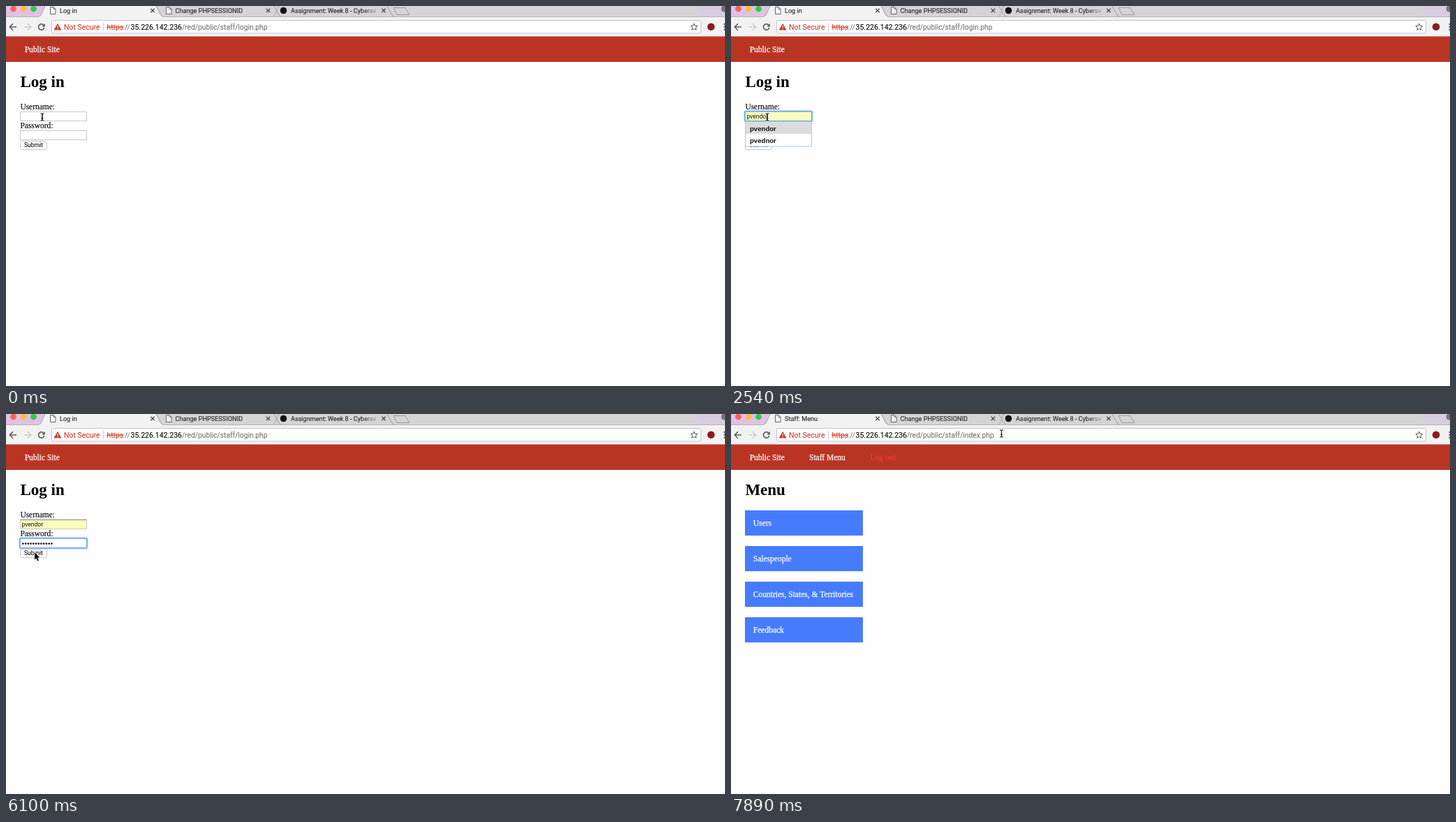
These frames come from a looping animation (1030x544 px, 8 s). An HTML page with a canvas:

```html
<!DOCTYPE html>
<html lang="en">
<head>
<meta charset="utf-8">
<title>Log in</title>
<style>
  html, body { margin: 0; width: 100%; height: 100%; overflow: hidden; background: #fefefe; }
  canvas { display: block; width: 1030px; height: 544px; }
</style>
</head>
<body>
<canvas id="stage"></canvas>
<script>
const W = 1030, H = 544, LOOP = 8000;
const canvas = document.getElementById('stage');
const ctx = canvas.getContext('2d');
const ratio = window.devicePixelRatio || 1;
canvas.width = W * ratio;
canvas.height = H * ratio;

const UI = 'Roboto, sans-serif';
const SERIF = '"Liberation Serif", serif';
const USER = 'pvendor';
const SUGGESTIONS = [USER, 'pvednor'];

const START = {
  page: 'login', loading: false, url: 'login.php', focus: '', user: '', filled: false,
  dots: 0, caret: 0, list: false, pick: false, pressed: false, pointer: ['beam', 52, 159]
};

// Each entry changes part of the state from its time on.
const STEPS = [
  [900, { focus: 'user', caret: 22.5 }],
  [1350, { caret: 0 }],
  [1640, { user: 'p', list: true, caret: 27.5 }],
  [2240, { caret: 0 }],
  [2540, { user: USER, filled: true, pick: true }],
  [2830, { list: false, pick: false, caret: 54.5 }],
  [3280, { caret: 0 }],
  [3580, { focus: 'pass', caret: 22.5 }],
  [4030, { caret: 0 }],
  [4330, { dots: 6, caret: 45.5 }],
  [4480, { dots: 12, caret: 67.5 }],
  [4770, { pointer: ['arrow', 45, 182] }],
  [4920, { pointer: ['arrow', 36, 199], caret: 0 }],
  [5070, { pointer: ['arrow', 37, 201.5] }],
  [5360, { caret: 67.5 }],
  [5810, { caret: 0 }],
  [6100, { pointer: ['arrow', 41, 198] }],
  [6250, { focus: '', pressed: true }],
  [6400, { pressed: false, loading: true }],
  [6550, { url: 'index.php' }],
  [6850, { page: 'menu', loading: false }],
  [7150, { pointer: ['arrow', 58, 188] }],
  [7300, { pointer: ['arrow', 128, 150] }],
  [7450, { pointer: ['arrow', 235, 95] }],
  [7590, { pointer: ['arrow', 322, 52] }],
  [7740, { pointer: ['beam', 374, 31] }],
  [7890, { pointer: ['beam', 387.5, 28] }]
];

function stateAt(t) {
  return Object.assign({}, START, ...STEPS.filter(s => s[0] <= t).map(s => s[1]));
}

function box(x, y, w, h, fill) {
  ctx.fillStyle = fill;
  ctx.fillRect(x, y, w, h);
}

function disc(x, y, r, fill) {
  ctx.fillStyle = fill;
  ctx.beginPath();
  ctx.arc(x, y, r, 0, Math.PI * 2);
  ctx.fill();
}

function text(str, x, y, font, fill, weight = 0) {
  ctx.font = font;
  ctx.fillStyle = fill;
  ctx.fillText(str, x, y);
  if (weight) {
    ctx.strokeStyle = fill;
    ctx.lineWidth = weight;
    ctx.strokeText(str, x, y);
  }
}

function trace(points, closed) {
  ctx.beginPath();
  points.forEach(([x, y]) => ctx.lineTo(x, y));
  if (closed) ctx.closePath();
}

function line(points, color, width = 1, closed = false) {
  trace(points, closed);
  ctx.strokeStyle = color;
  ctx.lineWidth = width;
  ctx.stroke();
}

function shape(points, fill) {
  trace(points, true);
  ctx.fillStyle = fill;
  ctx.fill();
}

function rounded(x, y, w, h, r, fill, stroke, width = 1) {
  ctx.beginPath();
  ctx.roundRect(x, y, w, h, r);
  if (fill) { ctx.fillStyle = fill; ctx.fill(); }
  if (stroke) { ctx.strokeStyle = stroke; ctx.lineWidth = width; ctx.stroke(); }
}

function cross(x, y, r, color, width) {
  line([[x - r, y - r], [x + r, y + r]], color, width);
  line([[x - r, y + r], [x + r, y - r]], color, width);
}

function pageIcon(x) {
  const outline = [[x, 1.5], [x + 4.5, 1.5], [x + 7.5, 4.5], [x + 7.5, 11.5], [x, 11.5]];
  shape(outline, '#f8f8f8');
  line(outline, '#666', 1, true);
  line([[x + 4.5, 1.5], [x + 4.5, 4.5], [x + 7.5, 4.5]], '#666', 0.9);
}

function tabStrip(s, t) {
  box(0, 0, W, 16, '#d5d3d6');
  shape([[0, 0], [57, 0], [49, 16], [0, 16]], '#dfc2e3');
  box(991, 0, 39, 16, '#d6cde0');
  line([[0, 15.5], [W, 15.5]], '#b5b3b6');

  for (const x of [388, 550]) {
    line([[x - 4, 0], [x + 3, 13], [x + 6, 15.5]], '#9c9a9d');
  }
  line([[391, 0], [384, 15]], '#aaa8ab');
  line([[555, 2.5], [572, 2.5], [578, 12.5], [560, 12.5]], '#99979a', 1, true);

  const active = [[46, 16], [50, 13], [56, 0], [215, 0], [222, 13], [226, 16]];
  shape(active, '#f3f2f3');
  line(active.slice(0, 3), '#a9a0ab');
  line(active.slice(3), '#9c9a9d');

  ['#fc605b', '#fdbc40', '#34c84a'].forEach((c, i) => disc(10.5 + i * 14.5, 4, 4.4, c));

  if (s.loading) {
    const turn = (t - 6700) / 1000 * Math.PI * 2;
    ctx.beginPath();
    ctx.arc(67.5, 6.5, 5, turn - 1.4, turn + 0.6);
    ctx.strokeStyle = '#4a86e8';
    ctx.lineWidth = 1.5;
    ctx.stroke();
  } else {
    pageIcon(63.5);
  }
  pageIcon(229.5);
  disc(397.5, 6.5, 4.8, '#111');

  const font = '9.15px ' + UI;
  text(s.page === 'login' ? 'Log in' : 'Staff: Menu', 77, 9.5, font, '#222', 0.12);
  text('Change PHPSESSIONID', 242.5, 9.5, font, '#222', 0.12);
  const fade = ctx.createLinearGradient(510, 0, 534, 0);
  fade.addColorStop(0, '#222');
  fade.addColorStop(1, 'rgba(34,34,34,0)');
  text('Assignment: Week 8 - Cyberse', 408, 9.5, font, fade, 0.12);
  for (const x of [210, 375.5, 541]) cross(x, 6.5, 2.7, '#4d4d4d', 1.3);
  disc(1029, 4, 4.5, '#77737a');
}

function star(x, y, r) {
  const points = Array.from({ length: 10 }, (_, i) => {
    const a = -Math.PI / 2 + i * Math.PI / 5, d = i % 2 ? r * 0.45 : r;
    return [x + d * Math.cos(a), y + d * Math.sin(a)];
  });
  line(points, '#555', 1, true);
}

function arrowIcon(x, dir, color) {
  line([[x - 5 * dir, 30], [x + 4.5 * dir, 30]], color, 1.4);
  line([[x, 25.3], [x + 4.7 * dir, 30], [x, 34.7]], color, 1.4);
}

function toolbar(s) {
  box(0, 16, W, 27.5, '#f3f2f3');
  arrowIcon(10, -1, '#4f4f4f');
  arrowIcon(31, 1, '#c9c9c9');
  if (s.loading) {
    cross(51, 30, 3.8, '#4f4f4f', 1.5);
  } else {
    ctx.beginPath();
    ctx.arc(50.7, 30, 4.2, 0.25, Math.PI * 1.75);
    ctx.strokeStyle = '#4f4f4f';
    ctx.lineWidth = 1.5;
    ctx.stroke();
    shape([[55.8, 25], [55.8, 29.4], [51.4, 29.4]], '#4f4f4f');
  }

  rounded(65.5, 20.5, 930, 18.5, 2, '#fff', '#c6c5c6');
  shape([[74, 24.8], [79.5, 34.5], [68.5, 34.5]], '#c93b2b');
  box(73.5, 28, 1.1, 3.2, '#fff');
  box(73.5, 32.2, 1.1, 1.1, '#fff');
  const red = '#cf3f30';
  text('Not Secure', 83, 33.6, '10.5px ' + UI, red, 0.1);
  line([[139.5, 24], [139.5, 36]], '#cfcfcf');

  const font = '10.4px ' + UI;
  text('https', 144.5, 33.6, font, red, 0.1);
  line([[144, 30.5], [168, 30.5]], red);
  text('://', 167.8, 33.6, font, '#777');
  text('35.226.142.236', 178.5, 33.6, '10.55px ' + UI, '#111', 0.15);
  text('/red/public/staff/' + s.url, 252, 33.6, '10.25px ' + UI, '#737373', 0.1);

  star(985.8, 30.2, 5.2);
  disc(1010, 29.8, 5.3, '#8c1c1c');
  for (const y of [26, 30, 34]) disc(1029.5, y, 1.2, '#555');
}

function navBar(s) {
  box(0, 43.5, W, 36.5, '#ba3424');
  const font = '11.5px ' + SERIF;
  text('Public Site', 26.7, 66, font, '#fff', 0.25);
  if (s.page === 'menu') {
    text('Staff Menu', 112, 66, font, '#fff', 0.25);
    text('Log out', 199.5, 66, font, '#e9452f', 0.2);
  }
}

function field(y, focused, filled) {
  box(20, y, 96, 14, filled ? '#faffbd' : '#fff');
  if (focused) {
    rounded(19.3, y - 0.7, 97.2, 15.2, 2, null, '#c4dcf8', 2.4);
    rounded(20, y, 95.8, 13.8, 1, null, '#6ba7ee', 1.6);
  } else {
    ctx.strokeStyle = '#c9c9c9';
    ctx.lineWidth = 1;
    ctx.strokeRect(20.5, y + 0.5, 95, 13);
    if (filled) line([[20, y + 0.5], [116, y + 0.5]], '#85856f');
  }
}

function suggestions(s) {
  box(20, 165, 96, 36, '#fff');
  if (s.pick) box(21, 166, 94, 17, '#dcdcdc');
  ctx.strokeStyle = '#a9c8ee';
  ctx.lineWidth = 1;
  ctx.strokeRect(20.5, 165.5, 95, 35.5);
  SUGGESTIONS.forEach((name, i) =>
    text(name, 27, 178.7 + i * 17.4, 'bold 9.6px "Liberation Sans", sans-serif', '#111'));
}

function loginPage(s) {
  const label = '11.45px ' + SERIF;
  text('Log in', 20.4, 116, 'bold 23px ' + SERIF, '#000');
  text('Username:', 20.4, 148, label, '#000', 0.12);
  text('Password:', 20.4, 175, label, '#000', 0.12);
  field(151, s.focus === 'user', s.filled);
  field(178, s.focus === 'pass', false);

  const small = '8.5px ' + UI;
  text(s.user, 22.5, 161, small, '#111');
  for (let i = 0; i < s.dots; i++) disc(24.3 + i * 3.74, 185.6, 1.3, '#111');
  rounded(20.5, 193.5, 38, 12, 2.5, s.pressed ? '#dcdcdc' : '#fff', '#c6c6c6');
  text('Submit', 26, 202.2, small, '#111', 0.1);
  if (s.list) suggestions(s);
  if (s.caret) {
    const y = s.focus === 'user' ? 153 : 180;
    line([[s.caret, y], [s.caret, y + 10]], '#111', 0.9);
  }
}

function menuPage() {
  text('Menu', 20.4, 116, 'bold 23px ' + SERIF, '#000');
  ['Users', 'Salespeople', 'Countries, States, & Territories', 'Feedback'].forEach((name, i) => {
    const y = 138 + i * 50.9;
    box(20, Math.round(y), 169, 36, '#467bfb');
    text(name, 31.8, Math.round(y) + 22, '11.5px ' + SERIF, '#fff', 0.25);
  });
}

function beam(x, y) {
  const half = [[-2.5, -5], [-0.8, -5], [0, -4], [0, 4], [-0.8, 5], [-2.5, 5]];
  for (const [color, width] of [['rgba(255,255,255,.8)', 2.4], ['#111', 1.1]]) {
    for (const side of [1, -1]) line(half.map(([a, b]) => [x + a * side, y + b]), color, width);
  }
  line([[x - 1.5, y + 1.5], [x + 1.5, y + 1.5]], '#111', 0.9);
}

function arrow(x, y) {
  const points = [[0, 0], [0, 10.6], [2.4, 8.4], [4.1, 12.4], [5.9, 11.6], [4.2, 7.7], [7.4, 7.6]]
    .map(([a, b]) => [x + a, y + b]);
  line(points, '#fff', 1.6, true);
  shape(points, '#000');
}

function draw(t) {
  const s = stateAt(t);
  ctx.setTransform(ratio, 0, 0, ratio, 0, 0);
  box(0, 0, W, H, '#fefefe');
  tabStrip(s, t);
  toolbar(s);
  navBar(s);
  if (s.page === 'login') loginPage(s);
  else menuPage();
  const [kind, x, y] = s.pointer;
  (kind === 'beam' ? beam : arrow)(x, y);
}

const begin = performance.now();
function frame() {
  draw((performance.now() - begin) % LOOP);
  requestAnimationFrame(frame);
}
frame();
</script>
</body>
</html>
```
